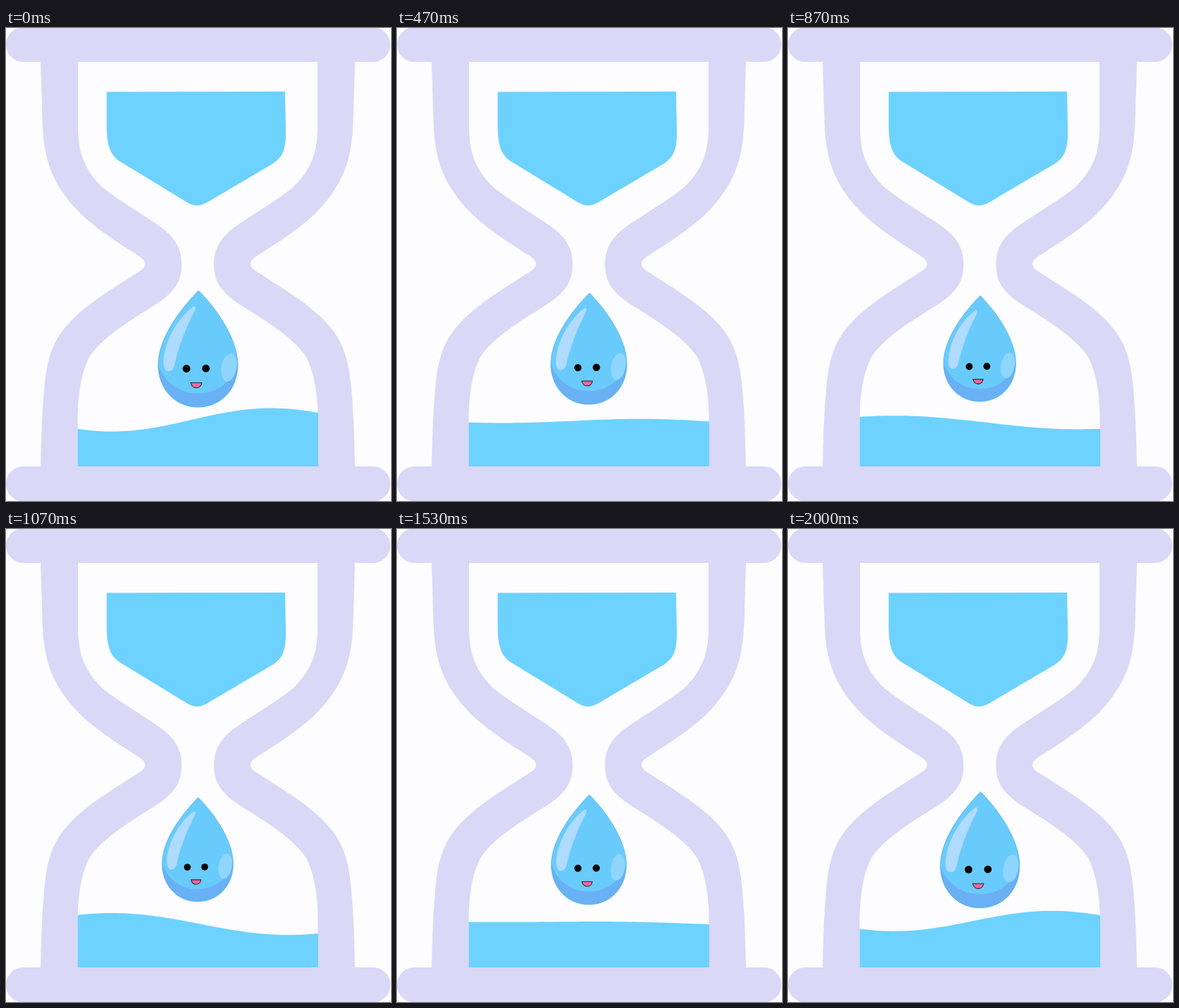
Recreate the animation shown at these times as an HTML page. Size 545 by 670 pixels, loop 2.07 s.

```html
<!DOCTYPE html>
<html lang="en">
<head>
<meta charset="utf-8">
<title>Water hourglass</title>
<style>
  html, body { margin: 0; width: 100%; height: 100%; overflow: hidden; background: #fdfcff; }
  svg { display: block; width: 100vw; height: 100vh; }
</style>
</head>
<body>
<svg viewBox="0 0 545 670">
  <defs>
    <path id="side" d="M49 46 L51.500 130 C53 180 62 215 97 254 C120 280 160 305 185 321
      Q209 334.500 185 347 C160 364 130 380 101 406 C70 435 57 460 53.500 520
      C51 545 50 580 49 623 H101.500 V550 C102 520 106 490 118 466
      C135 440 170 418 205 396 C235 378 248.500 362 248.500 336
      C248.500 322 247 304 222 284 C190 261 160 245 137 226 C110 200 102 175 102 140 V46Z"/>
    <path id="body" d="M272.500 372 C255 390 215 435 215.500 478 C216 512 240 537 271.500 537
      C304 537 328 512 328 477 C328 436 291 390 272.500 372Z"/>
    <clipPath id="inside"><use href="#body"/></clipPath>
  </defs>

  <g fill="#d9d8f7">
    <rect y="-1" width="544" height="49" rx="24.500"/>
    <rect y="621" width="544" height="49.500" rx="24.500"/>
    <use href="#side"/>
    <use href="#side" transform="matrix(-1 0 0 1 543 0)"/>
  </g>

  <g fill="#6dd2ff">
    <path d="M142.500 90.500 L395 90 L396 140 C397 170 393 182 378 192 L283 248
      Q270 255 258 248 L163 190 C148 181 143 168 142.500 140Z"/>
    <path id="wave"/>
  </g>

  <g id="drop">
    <use href="#body" fill="#69cbfb"/>
    <g clip-path="url(#inside)">
      <path fill="#69b1f4" d="M213 470 C221 500 244 517.500 272 517.500 C300 517.500 322 500 330 470 V540 H213Z"/>
      <ellipse cx="315.500" cy="481" rx="10.500" ry="20" transform="rotate(10 315.500 481)" fill="#8fd6ff"/>
    </g>
    <use href="#body" fill="none" stroke="#5eb8ee"/>
    <path fill="#afdbff" d="M266 394 C269 394 268.500 398 267 401 C253 428 246 448 240 471
      C238 481 236 487 229 486 C222 485 222 473 224 462 C229 435 246 408 266 394Z"/>
    <circle cx="255.500" cy="482.500" r="5.400"/>
    <circle cx="283" cy="482.200" r="5.400"/>
    <path d="M261.500 502.500 H277 C276 512 263 512 261.500 502.500Z" fill="#f4679c" stroke="#2b2b3a" stroke-width="1.200"/>
  </g>
</svg>
<script>
  const LOOP = 2070, STEPS = 31, PEAK = 16;
  const wave = document.getElementById('wave');
  const drop = document.getElementById('drop');

  const mix = (a, b, p) => a + (b - a) * p;
  const smooth = p => p * p * (3 - 2 * p);

  // Height of the water at x: one sine-shaped surface tilts into the opposite one.
  function surface(x, p) {
    const swell = halfWave => Math.cos((x - 150) / halfWave * Math.PI);
    return mix(555 + 16.5 * swell(225), 559.5 - 15.5 * swell(250), p);
  }

  function draw(now) {
    // 15 steps per second, each starting on a whole 10 ms.
    const step = Math.min(Math.floor((now % LOOP + 3.4) * 15 / 1000), STEPS - 1);
    const p = step < PEAK ? step / PEAK : (STEPS - step) / (STEPS - PEAK);

    let d = 'M101.5 621';
    for (let x = 101.5; x <= 442; x += 5) d += `L${x} ${surface(x, p)}`;
    wave.setAttribute('d', `${d}L442 ${surface(442, p)}V621Z`);

    // The drop shrinks with a gentle, half-strength ease.
    const scale = mix(1, 0.893, mix(p, smooth(p), 0.5));
    drop.setAttribute('transform', `translate(267 450) scale(${scale}) translate(-267 -450)`);
  }

  const start = performance.now();
  function tick() {
    draw(performance.now() - start);
    requestAnimationFrame(tick);
  }
  tick();
</script>
</body>
</html>
```
